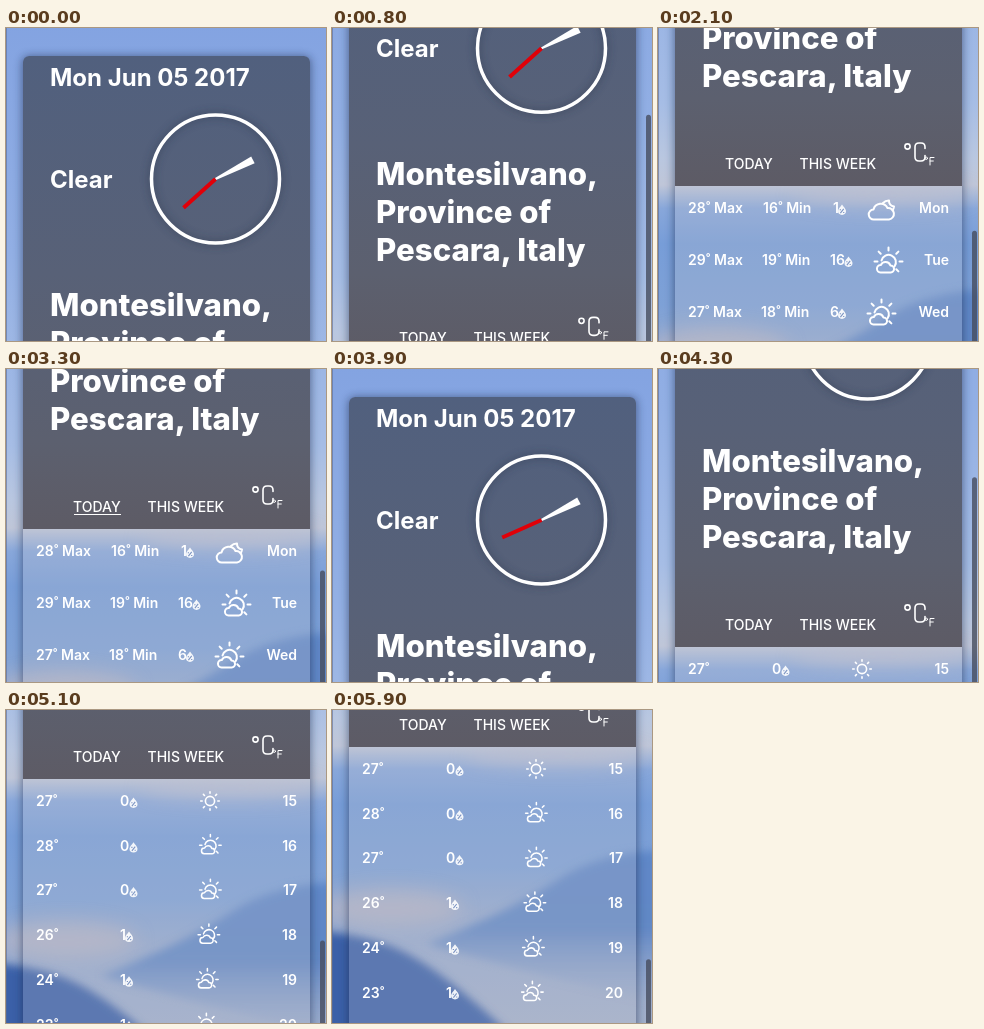
An HTML page for the animation above (6000 ms loop, 320 px wide and 313 px high).

```html
<!DOCTYPE html>
<html lang="en">
<head>
<meta charset="utf-8">
<title>Weather card</title>
<style>
html, body { margin: 0; width: 100%; height: 100%; overflow: hidden; background: #88a7e2; }
svg { display: block; width: 320px; height: 313px; font-family: Inter, "Open Sans", sans-serif; fill: #fff; }
.date { font-size: 24px; font-weight: 700; }
.city { font-size: 31.2px; font-weight: 800; }
.tab { font-size: 14px; font-weight: 500; }
.row { font-size: 14px; font-weight: 600; }
.end { text-anchor: end; }
.line { fill: none; stroke: #fff; stroke-linecap: round; stroke-linejoin: round; }
</style>
</head>
<body>
<svg viewBox="0 0 320 313">
  <defs>
    <linearGradient id="sky" x1="0" y1="0" x2="0" y2="1">
      <stop offset="0" stop-color="#83a3e1"/>
      <stop offset=".3" stop-color="#92afe4"/>
      <stop offset=".5" stop-color="#a6bde5"/>
      <stop offset=".57" stop-color="#b9c7e0"/>
      <stop offset=".605" stop-color="#bfc6d8"/>
      <stop offset=".635" stop-color="#88a7da"/>
      <stop offset=".68" stop-color="#779dd8"/>
      <stop offset=".76" stop-color="#7ea1d6"/>
      <stop offset=".82" stop-color="#94a9cf"/>
      <stop offset="1" stop-color="#a7b2ca"/>
    </linearGradient>
    <linearGradient id="ridge" x1="0" y1="0" x2="0" y2="1">
      <stop offset="0" stop-color="#5f87c8"/>
      <stop offset=".5" stop-color="#6288c5"/>
      <stop offset="1" stop-color="#8fa4ca" stop-opacity="0"/>
    </linearGradient>
    <linearGradient id="head" x1="0" y1="0" x2="0" y2="1">
      <stop offset="0" stop-color="#51607e"/>
      <stop offset=".5" stop-color="#586177"/>
      <stop offset=".8" stop-color="#5c606f"/>
      <stop offset="1" stop-color="#5d5b65"/>
    </linearGradient>
    <filter id="soft" x="-40%" y="-40%" width="180%" height="180%"><feGaussianBlur stdDeviation="9"/></filter>
    <filter id="edge" x="-10%" y="-10%" width="120%" height="120%"><feGaussianBlur stdDeviation="4"/></filter>
    <clipPath id="outside">
      <path clip-rule="evenodd" d="M0 0H320V960H0ZM17 960V34a6 6 0 0 1 6-6H298a6 6 0 0 1 6 6V960Z"/>
    </clipPath>
    <g id="rain">
      <path d="M0-5C1.5-2.5 4-.8 4 1.6A4 3.8 0 0 1-4 1.6C-4-.8-1.5-2.5 0-5Z" opacity=".9"/>
      <path d="M1.7-.6L-1.6 3.6M-2.2.2h1.2M1.1 3h1.2" stroke="#7d95c3" stroke-width="1.1"/>
    </g>
    <g id="cloud" class="line" stroke-width="2">
      <path d="M-8 9.5a5 5 0 0 1-.5-10a7.5 7.5 0 0 1 14-1.5a5.8 5.8 0 0 1 1.5 11.5Z"/>
      <path d="M1-7a8 8 0 0 1 6-2.5a5.5 5.5 0 0 0 5 6a8 8 0 0 1-1.5 4"/>
    </g>
    <g id="sun" class="line" stroke-width="1.6"><circle r="4.6"/></g>
    <g id="partly" class="line" stroke-width="2">
      <path d="M-7.5 10.5a3.7 3.7 0 0 1 .3-7.4a5.2 5.2 0 0 1 9.6.4a3.5 3.5 0 0 1 .3 7Z"/>
      <path d="M-6.5-1.5a7.3 7.3 0 1 1 13 6"/>
    </g>
  </defs>

  <g id="page">
    <rect width="320" height="780" y="-10" fill="url(#sky)"/>
    <g filter="url(#soft)">
      <ellipse cx="225" cy="472" rx="90" ry="10" fill="#bcbfd0" opacity=".7"/>
      <ellipse cx="60" cy="624" rx="70" ry="18" fill="#b5b5c6" opacity=".8"/>
    </g>
    <path d="M350 565Q270 566 225 596T95 660Q200 690 350 725Z" fill="url(#ridge)" filter="url(#edge)"/>
    <path d="M-30 646Q30 648 70 667T178 750V790H-30Z" fill="#3a60a8" filter="url(#edge)"/>

    <g clip-path="url(#outside)">
      <rect x="16" y="28" width="289" height="960" rx="7" fill="#1d2c50" opacity=".55" filter="url(#edge)"/>
    </g>
    <rect x="17" y="463" width="287" height="480" fill="#c6c4cc" opacity=".24"/>
    <path d="M17 463V34a6 6 0 0 1 6-6H298a6 6 0 0 1 6 6V463Z" fill="url(#head)"/>

    <text class="date" x="44" y="58">Mon Jun 05 2017</text>
    <text class="date" x="44" y="160">Clear</text>
    <g transform="translate(209.5 151)">
      <circle r="64" fill="none" stroke="#28334a" stroke-width="5" opacity=".5" filter="url(#edge)"/>
      <circle r="64" fill="none" stroke="#fff" stroke-width="3.5"/>
      <path d="M-1 0L-3.8-42L3.8-42L1 0Z" transform="rotate(63)"/>
      <path id="second" d="M0 0V-43" stroke="#e00008" stroke-width="4"/>
    </g>
    <g class="city">
      <text x="44" y="288">Montesilvano,</text>
      <text x="44" y="326">Province of</text>
      <text x="44" y="364">Pescara, Italy</text>
    </g>
    <text class="tab" x="67" y="446">TODAY</text>
    <path id="under" d="M68 448.5H115" stroke="#fff" stroke-width="1.2"/>
    <text class="tab" x="141.5" y="446">THIS WEEK</text>
    <g class="line" stroke-width="1.6">
      <circle cx="249.5" cy="423.5" r="2.6"/>
      <path d="M267 425.5V424q0-4-4-4h-2q-4 0-4 4v10q0 4 4 4h2q4 0 4-4v-1.5"/>
      <g stroke-width="1"><circle cx="268.3" cy="435.3" r="1.2"/><path d="M272 442V434.5h4M272 438h3.3"/></g>
    </g>
    <g id="week" class="row"></g>
    <g id="today" class="row"></g>
  </g>
  <path d="M.5 0V313" stroke="#5c6c94" opacity=".6"/>
  <rect id="thumb" x="314" width="5" rx="2.5" fill="#474d5e"/>
</svg>

<script>
const $ = id => document.getElementById(id);
const LOOP = 6000, STEP = 100, VIEW = 601, TOP = 485;
const SWITCH = 3900;

// time in ms, scroll offset in px
const scrollKeys = [
  [0, 0], [100, 4], [300, 27], [700, 108], [1000, 176], [1300, 233], [1600, 275],
  [1900, 300], [2100, 305], [2600, 304], [3000, 303], [3899, 303],
  [3900, 0], [4000, 36], [4300, 185], [4500, 258], [4700, 316], [5000, 379],
  [5200, 409], [5400, 426], [5700, 427], [5900, 426]
];

// max, min, min x, rain, rain x, drop x, icon, icon x, day
const week = [
  [28, 16, 105, 1, 175, 184, "cloud", 224, "Mon"],
  [29, 19, 104, 16, 172, 190.5, "partly", 230, "Tue"],
  [27, 18, 103, 6, 172, 184, "partly", 223, "Wed"]
];
// temperature, rain, icon, icon x
const today = [
  [27, 0, "sun", 204], [28, 0, "partly", 204], [27, 0, "partly", 204],
  [26, 1, "partly", 202.5], [24, 1, "partly", 201], [23, 1, "partly", 200]
];

function rays(id, cx, cy, from, to, angles) {
  let d = "";
  for (const a of angles) {
    const c = Math.cos(a * Math.PI / 180), s = Math.sin(a * Math.PI / 180);
    d += `M${cx + from * c} ${cy + from * s}L${cx + to * c} ${cy + to * s}`;
  }
  $(id).innerHTML += `<path d="${d}"/>`;
}
rays("sun", 0, 0, 7.8, 9.3, [0, 45, 90, 135, 180, 225, 270, 315]);
rays("partly", .5, -.5, 11, 14, [-180, -135, -90, -45, 0, 45]);

const text = (x, y, s, cls = "") => `<text class="${cls}" x="${x}" y="${y + 5}">${s}</text>`;
const icon = (id, x, y, k = 1) => `<use href="#${id}" transform="translate(${x} ${y}) scale(${k})"/>`;

$("week").innerHTML = week.map(([max, min, mx, rain, rx, dx, id, ix, day], i) => {
  const y = TOP + i * 52;
  return text(30, y, max + "˚ Max") + text(mx, y, min + "˚ Min") + text(rx, y, rain) +
    icon("rain", dx, y + 1.5) + icon(id, ix, y + 2) + text(291, y, day, "end");
}).join("");

$("today").innerHTML = today.map(([temp, rain, id, x], i) => {
  const y = TOP + i * 44.7;
  return text(30, y, temp + "˚") + text(114, y, rain) + icon("rain", rain ? 123 : 127.5, y + 1.5) +
    icon(id, x, y, id === "sun" ? 1 : .77) + text(291, y, 15 + i, "end");
}).join("");

function scrollAt(t) {
  const i = scrollKeys.findIndex(k => k[0] > t);
  if (i < 0) return scrollKeys[scrollKeys.length - 1][1];
  const [t0, a] = scrollKeys[i - 1], [t1, b] = scrollKeys[i];
  return a + (b - a) * (t - t0) / (t1 - t0);
}

function barAlpha(t) {
  if (t === 0 || t === SWITCH) return 0;
  return t < SWITCH ? Math.max(0, Math.min(1, (3600 - t) / 300)) : 1;
}

function draw(now) {
  const t = Math.floor(now % LOOP / STEP) * STEP;
  const y = scrollAt(t), hourly = t >= SWITCH;
  const ratio = VIEW / (hourly ? 1027 : 904);
  $("page").setAttribute("transform", `translate(0 ${-y})`);
  $("week").style.display = hourly ? "none" : "";
  $("today").style.display = hourly ? "" : "none";
  $("under").style.display = t >= 2900 && !hourly ? "" : "none";
  $("second").setAttribute("transform", `rotate(${228 + 6 * Math.floor(t / 1000)})`);
  $("thumb").setAttribute("y", y * ratio);
  $("thumb").setAttribute("height", VIEW * ratio);
  $("thumb").style.opacity = .8 * barAlpha(t);
}

const start = performance.now();
function tick() {
  draw(performance.now() - start);
  requestAnimationFrame(tick);
}
tick();
</script>
</body>
</html>
```
